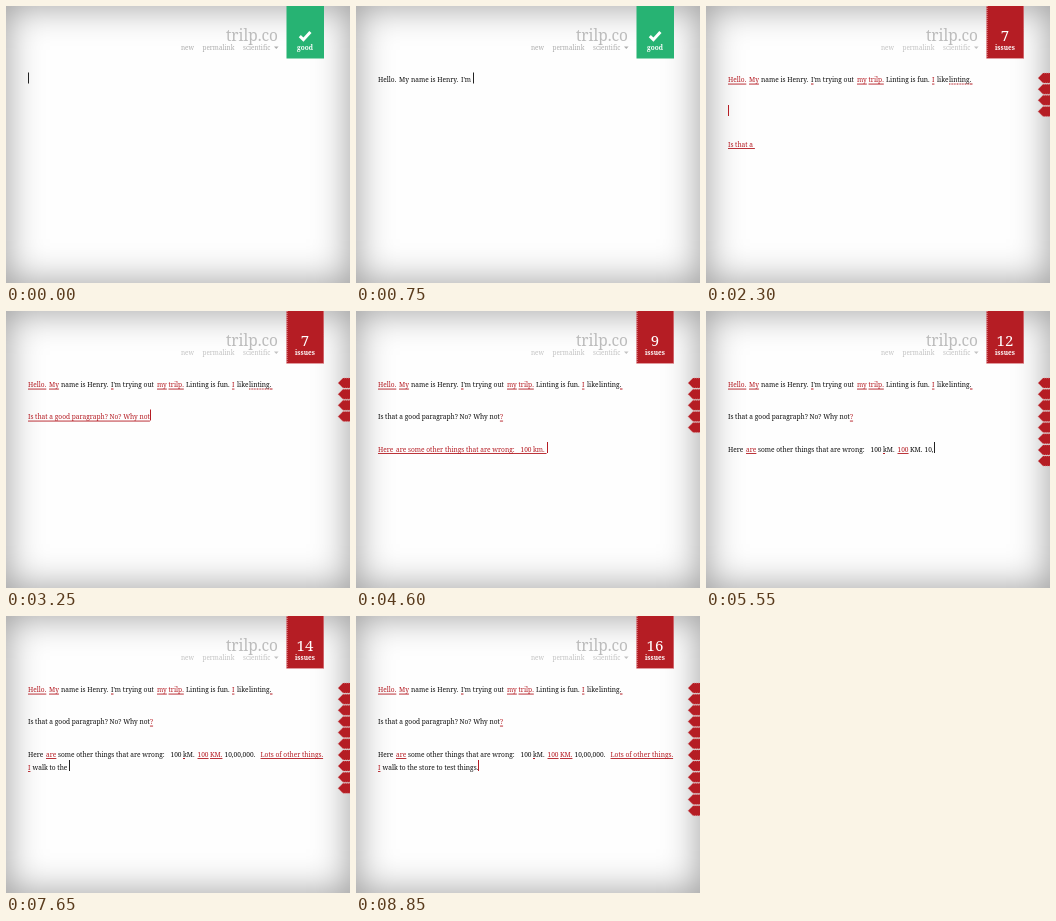
An HTML page that plays this animation: 344 by 277 pixels, repeating every 8.9 s.

```html
<!DOCTYPE html>
<html lang="en">
<head>
<meta charset="utf-8">
<title>Writing checker</title>
<style>
  html, body { margin: 0; width: 100%; height: 100%; overflow: hidden; background: #fefefe; }
  svg { position: absolute; left: 0; top: 0; width: 344px; height: 277px; }
  .shade { position: absolute; left: 0; top: 0; width: 344px; height: 277px; box-shadow: inset 0 0 36px rgba(0,0,0,.4); }
  text { font-family: "Noto Serif", "Liberation Serif", serif; font-size: 6.6px; white-space: pre; }
  .title { font-size: 15.4px; fill: #bcbcbc; }
  .nav text { font-size: 6.4px; }
  .badge text { fill: #fff; text-anchor: middle; }
  .badge .label { font-weight: 700; font-size: 6.5px; }
  .badge .count { font-size: 15px; }
</style>
</head>
<body>
<div class="shade"></div>
<svg viewBox="0 0 344 277">
  <text class="title" x="272" y="35" text-anchor="end">trilp.co</text>
  <g class="nav" id="nav">
    <text x="175" y="44">new</text>
    <text x="196.5" y="44">permalink</text>
    <text x="237" y="44">scientific</text>
    <path d="M268 40.5h4.6l-2.3 2.6z"/>
  </g>
  <g class="badge">
    <rect id="flag" x="280.5" y="0" width="37.5" height="52.5"/>
    <path id="stitch" d="M281 0V52.5H317.5V0" fill="none" stroke="#e9a9ac" stroke-width="1" stroke-dasharray="1 1"/>
    <path id="tick" d="M293.8 30.2l3.6 3.5l7-7.6" fill="none" stroke="#fff" stroke-width="3"/>
    <text id="count" class="count" x="299" y="34.5"></text>
    <text id="label" class="label" x="299" y="44"></text>
  </g>
  <g id="tags"></g>
  <g id="page"></g>
  <rect id="caret" width="1" height="11"/>
</svg>
<script>
const LOOP = 8900, TICK = 50, RED = '#b51d24', INK = '#111';
const NS = 'http://www.w3.org/2000/svg';
const $ = id => document.getElementById(id);

// Word groups: x (0 = follow on), text, time it is flagged.
const lines = [
  { start: 0, y: 76, parts: [
    [22, 'Hello. ', 2000], [43, 'My ', 2000], [55, 'name is Henry. '],
    [105, "I'm trying out "], [151, 'my ', 2000], [162.5, 'trilp. ', 2000],
    [180, 'Linting is fun. '], [226, 'I ', 2000], [231, 'like '], [243, 'linting.']] },
  { start: 2000, y: 108, red: [2100, 3700], parts: [
    [22, 'Is that a good paragraph? No? Why not'], [0, '?', 3700]] },
  { start: 3400, y: 140.5, red: [3500, 4750], parts: [
    [22, 'Here '], [40, 'are ', 4900], [52, 'some other things that are wrong: '],
    [164.5, '100 '], [177, 'km. '], [191.5, '100 ', 5350], [204, 'KM. ', 7300],
    [218.5, '10,00,000. '], [254.5, 'Lots of other things.', 7400]] },
  { start: 6950, y: 153.5, parts: [
    [22, 'I ', 7150], [26.5, 'walk to the store to test things.']] }
];

// Small underlines: x1, x2, y, from, to, dotted.
const marks = [
  [162.5, 176, 78, 1300, 2000, 1], [180, 203, 78, 1450, 1700, 1],
  [243, 264, 78, 1950, 4000, 1], [105, 107.5, 78, 2000, LOOP],
  [264, 266.5, 78, 2000, LOOP], [177, 179, 142.5, 4900, LOOP]
];

const typed = [[0, 0], [1500, 58], [2000, 81], [2300, 91], [3250, 118], [3350, 119],
  [3500, 119], [4600, 170], [4750, 168], [5450, 178], [6500, 210], [6950, 210],
  [8700, 245], [LOOP, 245]];

// Time, issues, side tags.
const issues = [[0, 0, 0], [2000, 7, 4], [3450, 8, 4], [3750, 9, 5], [4900, 13, 9],
  [5350, 12, 8], [5700, 11, 7], [7000, 12, 8], [7400, 14, 10], [7800, 16, 12]];

function make(tag, attrs, parent) {
  const el = document.createElementNS(NS, tag);
  set(el, attrs);
  return parent.appendChild(el);
}
function set(el, attrs) {
  for (const k in attrs) el.setAttribute(k, attrs[k]);
}
const show = (el, on) => el.setAttribute('visibility', on ? 'visible' : 'hidden');
const within = (t, span) => !!span && t >= span[0] && t < span[1];
const latest = (rows, t, key) => rows.filter(r => key(r) <= t).pop();

function amount(t) {
  const i = typed.findIndex(k => k[0] > t);
  const [t0, n0] = typed[i - 1], [t1, n1] = typed[i];
  return Math.floor(n0 + (n1 - n0) * (t - t0) / (t1 - t0) + 1e-6);
}

const page = $('page');
const rule = () => make('rect', { height: .9, fill: RED }, page);
for (const line of lines) {
  line.rule = rule();
  line.nodes = line.parts.map(([x, text, flagged]) =>
    ({ x, text, flagged, el: make('text', {}, page), rule: rule() }));
}
const markEls = marks.map(([x1, x2, y, , , dotted]) => make('line', {
  x1, x2, y1: y, y2: y, stroke: RED, 'stroke-width': 1, 'stroke-dasharray': dotted ? '1 .6' : 'none'
}, page));
const tagEls = Array.from({ length: 12 }, (_, i) => {
  const y = 72 + 11.15 * i;
  return make('path', {
    d: `M332 ${y}l5-5h8v10h-8z`, fill: RED, stroke: '#dc9699', 'stroke-width': .7, 'stroke-dasharray': '1 1'
  }, $('tags'));
});

function drawLine(line, t, left) {
  const lift = line === lines[1] && t < 2450 ? 32.5 : 0;
  const y = line.y + lift, allRed = within(t, line.red);
  let end = 22;
  for (const p of line.nodes) {
    const full = p.text === 'km. ' && t >= 4750 ? 'kM. ' : p.text;
    const part = full.slice(0, Math.max(0, left));
    left -= full.length;
    const word = part.trimEnd(), x = p.x || end;
    p.el.textContent = word;
    const width = word ? p.el.getComputedTextLength() : 0;
    const flagged = p.flagged <= t;
    set(p.el, { x, y, fill: flagged || allRed ? RED : INK });
    set(p.rule, { x, y: y + 1.6, width: flagged ? width : 0 });
    if (part) end = x + width + (part.length - word.length) * 1.8;
  }
  set(line.rule, { x: 22, y: y + 1.6, width: allRed ? end - 22 : 0 });
  return { x: end, y, red: allRed };
}

function draw(t) {
  let left = amount(t), caret;
  for (const line of lines) {
    const end = drawLine(line, t, left);
    left -= line.parts.reduce((n, p) => n + p[1].length, 0);
    if (t >= line.start) caret = end;
  }
  if (within(t, [2250, 2450])) caret = { x: 22, y: 108.5, red: true };
  set($('caret'), { x: Math.round(caret.x), y: caret.y - 9.5, fill: caret.red || t >= 8600 ? RED : '#222' });

  marks.forEach((m, i) => show(markEls[i], within(t, [m[3], m[4]])));

  const [, count, tags] = latest(issues, t, r => r[0]);
  tagEls.forEach((el, i) => show(el, i < tags));
  set($('flag'), { fill: count ? RED : '#27b373' });
  show($('stitch'), count);
  show($('tick'), !count);
  $('count').textContent = count || '';
  $('label').textContent = count ? 'issues' : 'good';
  set($('nav'), { fill: count ? '#c2c2c2' : '#adadad' });
}

const begin = performance.now();
function frame() {
  const t = (performance.now() - begin) % LOOP;
  draw(Math.floor(t / TICK) * TICK);
  requestAnimationFrame(frame);
}
frame();
</script>
</body>
</html>
```
